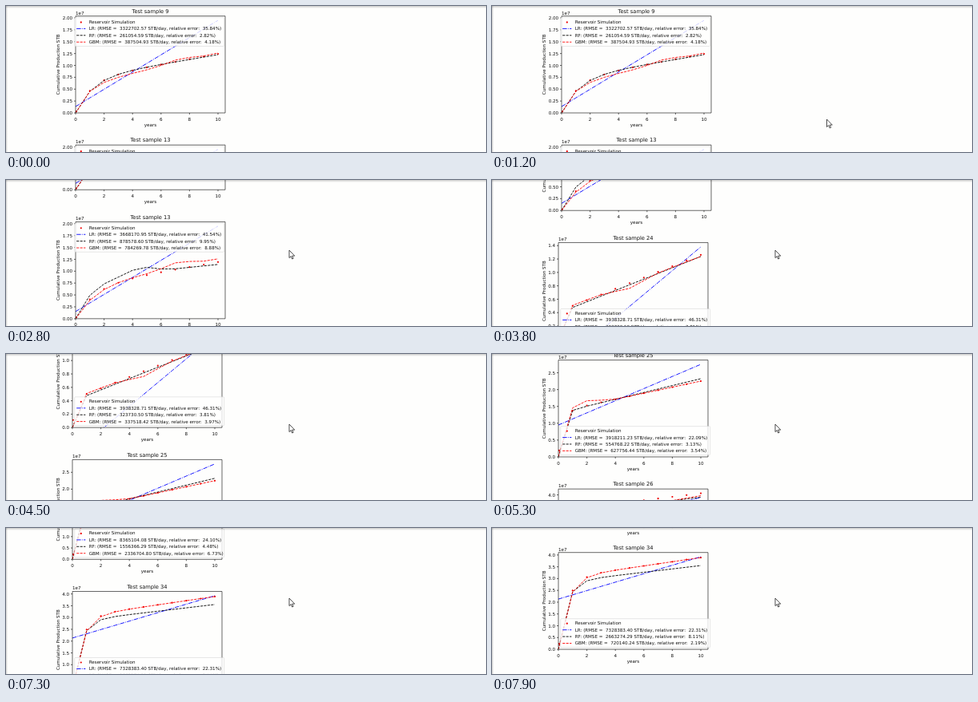
These frames come from a looping animation (600x183 px, 8000 ms). An HTML page:

```html
<!DOCTYPE html>
<html lang="en">
<head>
<meta charset="utf-8">
<title>Production forecasts</title>
<style>
html, body { margin: 0; width: 100%; height: 100%; overflow: hidden; background: #fefefd; }
svg { display: block; }
text { font: 5.58px "DejaVu Sans", sans-serif; white-space: pre; fill: #111; }
.title { font-size: 6.7px; }
.mid { text-anchor: middle; }
.end { text-anchor: end; }
.axis { fill: none; stroke: #000; stroke-width: .6; }
.line { fill: none; stroke-width: .9; }
.LR { stroke: #00f; stroke-dasharray: 5.4 1.3 .9 1.3; }
.RF { stroke: #000; stroke-dasharray: 3.1 1.35; }
.GBM { stroke: #f00; stroke-dasharray: 3.1 1.35; }
.dot { fill: #e00; }
.legend { fill: #fff; fill-opacity: .8; stroke: #ccc; stroke-opacity: .8; stroke-width: .6; }
</style>
</head>
<body>
<svg width="600" height="183" viewBox="0 0 600 183">
  <defs>
    <linearGradient id="top" x2="0" y2="1"><stop stop-opacity=".2"/><stop offset="1" stop-opacity="0"/></linearGradient>
    <linearGradient id="side"><stop stop-opacity=".2"/><stop offset="1" stop-opacity="0"/></linearGradient>
  </defs>
  <g id="page"></g>
  <rect width="600" height="3" fill="url(#top)"/>
  <rect width="2" height="183" fill="url(#side)"/>
  <path id="cursor" d="M0 0V9.6L2.2 7.6L3.7 11L5.2 10.3L3.7 7.1H6.8Z" fill="#fff" stroke="#222" stroke-width=".8"/>
</svg>
<script>
const TOP = 12.6, BOTTOM = 134, WIDTH = 187, YEAR = 17.8, PITCH = 161.6, LOOP = 8000;
const HIGH = 20, LOW = 101.2; // legend positions
const years = [...Array(11).keys()];

// Height in px above the x axis: fast early rise, steady growth, optional bump around one year.
const growth = (rise, rate, slope, bump = 0, at = 0) => x =>
  rise * (1 - Math.exp(-rate * x)) + slope * x + bump * Math.exp(-((x - at) ** 2) / 1.5);
const straight = (from, to) => x => from + (to - from) * x / 10;

const charts = [
  { id: 9, left: 87, tick: .25, gap: 14.88, legend: HIGH, truth: growth(41, .9, 3.3), models: {
    LR: [straight(8, 116), '3322702.57', '35.84'],
    RF: [growth(43, .82, 3), '261054.59', '2.82'],
    GBM: [growth(33, 1.17, 4.2, 4, 7.3), '387504.93', '4.18'] } },
  { id: 13, left: 87, tick: .25, gap: 14.88, legend: HIGH, truth: growth(40, .75, 3.1), models: {
    LR: [straight(9, 116), '3668170.95', '41.54'],
    RF: [growth(50, .8, 1.8, 7, 4.6), '878578.60', '9.95'],
    GBM: [growth(40, .67, 3.5, 6, 7.2), '784269.78', '8.88'] } },
  { id: 24, left: 83, tick: .2, gap: 16.8, legend: LOW, truth: growth(35, 6, 7.1), models: {
    LR: [straight(-33, 116), '3938328.71', '46.31'],
    RF: [growth(33, 6, 7.1), '323730.50', '3.81'],
    GBM: [growth(36, 6, 6.8, -6, 5), '337518.42', '3.97'] } },
  { id: 25, left: 83, tick: .5, gap: 21.1, legend: LOW, truth: growth(57, 3, 3.8), models: {
    LR: [straight(40, 116), '3918211.23', '22.09'],
    RF: [growth(55, 4, 4.3), '554768.22', '3.13'],
    GBM: [growth(57, 3, 3.8, 6, 1.9), '627756.44', '3.54'] } },
  { id: 26, left: 83, tick: .5, gap: 14.25, legend: LOW, truth: growth(94, 1.4, 2.2), models: {
    LR: [straight(60, 111), '8365104.08', '24.10'],
    RF: [growth(92, 1.4, 1.9, -2, 6.6), '1556366.29', '4.48'],
    GBM: [growth(82, 1.4, 3.1, 3, 5.8), '2336704.80', '6.73'] } },
  { id: 34, left: 83, tick: .5, gap: 14.78, legend: LOW, truth: growth(89, 1.6, 2.6), models: {
    LR: [straight(63, 116), '7328383.40', '22.31'],
    RF: [growth(84, 1.8, 2.1), '2663274.29', '8.11'],
    GBM: [growth(89, 1.5, 2.6), '720140.24', '2.19'] } },
];

const text = (x, y, s, cls = '') => `<text x="${x}" y="${y}" class="${cls}">${s}</text>`;
const dot = (x, y) => `<circle class="dot" cx="${x}" cy="${y}" r="1.1"/>`;

function chart({ id, left, tick, gap, legend, truth, models }, i) {
  const px = year => left + year * YEAR, py = h => BOTTOM - h;
  const mid = left + WIDTH / 2, row = n => legend + n * 8.4;
  let axis = `M${left} ${TOP}h${WIDTH}V${BOTTOM}h${-WIDTH}Z`, labels = '', curves = '', entries = '';

  for (let n = 0; py(n * gap) > TOP; n++) {
    const y = py(n * gap);
    axis += `M${left} ${y}h-2`;
    labels += text(left - 3.9, y + 2.1, (n * tick).toFixed(tick === .25 ? 2 : 1), 'end');
  }
  for (let n = 0; n <= 10; n += 2) {
    axis += `M${px(n)} ${BOTTOM}v2`;
    labels += text(px(n), 143.6, n, 'mid');
  }
  Object.entries(models).forEach(([name, [height, rmse, error]], n) => {
    const y = row(n + 1);
    curves += `<polyline class="line ${name}" points="${years.map(x => [px(x), py(height(x))])}"/>`;
    entries += `<path class="line ${name}" d="M88.2 ${y}h11.2"/>` +
      text(103.7, y + 2, `${name}: (RMSE =  ${rmse} STB/day, relative error:  ${error}%)`);
  });

  return `<g transform="translate(0 ${i * PITCH})">
    <clipPath id="clip${id}"><rect x="${left}" y="${TOP}" width="${WIDTH}" height="${BOTTOM - TOP}"/></clipPath>
    <g clip-path="url(#clip${id})">
      ${years.map(n => n || .05).map(x => dot(px(x), py(truth(x)))).join('')}${curves}
    </g>
    <path class="axis" d="${axis}"/>${labels}
    ${text(mid, 8.8, `Test sample ${id}`, 'title mid')}
    ${text(left, 10.6, '1e7')}
    ${text(mid, 151.2, 'years', 'mid')}
    <g transform="translate(66.7 73.3) rotate(-90)">${text(0, 0, 'Cumulative Production STB', 'mid')}</g>
    <rect class="legend" x="85.7" y="${legend - 5.6}" width="187" height="36" rx="1.1"/>
    ${dot(93.8, row(0) + .4)}${text(103.7, row(0) + 2, 'Reservoir Simulation')}${entries}
  </g>`;
}

const page = document.getElementById('page'), cursor = document.getElementById('cursor');
page.innerHTML = charts.map(chart).join('');

// Eased progress from 0 to 1 of a move that begins at start.
const ease = (t, start, length) => 1 - (1 - Math.min(1, Math.max(0, (t - start) / length))) ** 2;

// Start times of the wheel turns; each turn scrolls slightly less than the one before.
const turns = [2152, 2682, 3160, 3714, 4200, 4700, 5136, 5660, 6255, 6700, 7200, 7849];
const scrollAt = t => turns.reduce((sum, start, i) => sum + (75 - i) * ease(t, start, 300), 0);

function draw(now) {
  const t = Math.floor(now % LOOP / 100) * 100;
  const arrive = ease(t, 1200, 400);
  page.setAttribute('transform', `translate(0 ${-scrollAt(t)})`);
  cursor.setAttribute('visibility', t < 1200 ? 'hidden' : 'visible');
  cursor.setAttribute('transform', `translate(${418.5 - 64.5 * arrive} ${142 - 54 * arrive})`);
}
const origin = performance.now();
function loop() {
  draw(performance.now() - origin);
  requestAnimationFrame(loop);
}
loop();
</script>
</body>
</html>
```
